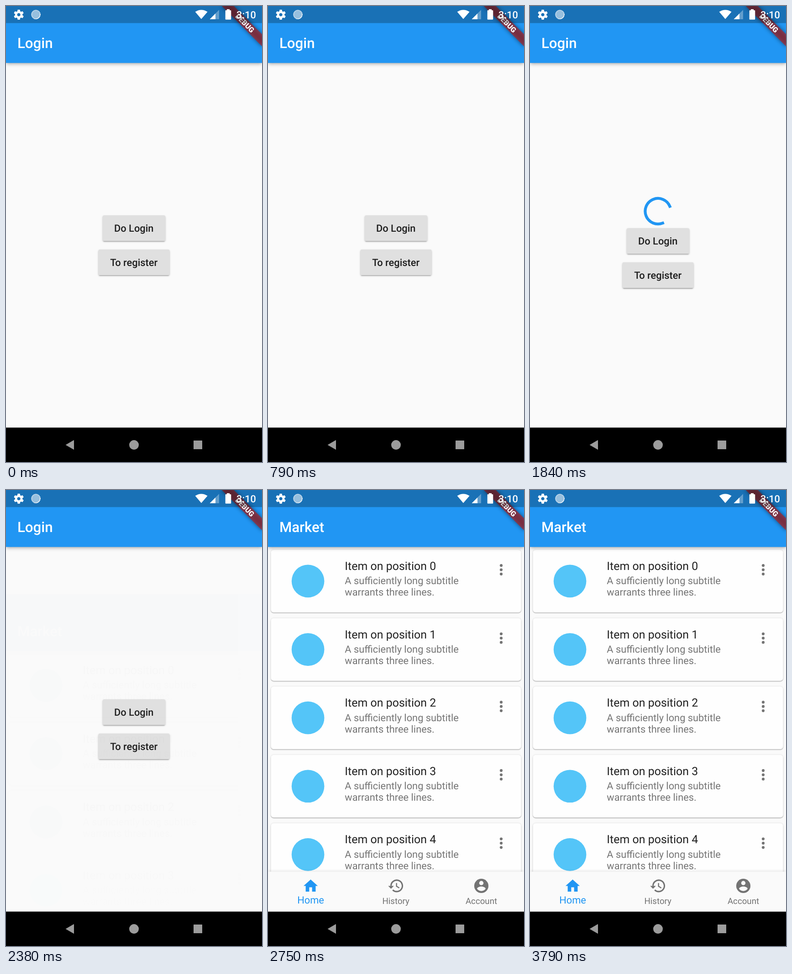
Recreate the animation shown at these times as an HTML page. Size 561 px wide and 998 px high, loop 4000 ms.

```html
<!DOCTYPE html>
<html lang="en">
<head>
<meta charset="utf-8">
<title>Login flow</title>
<style>
  html, body { margin: 0; width: 100%; height: 100%; overflow: hidden; background: #000; }
  /* Everything is laid out on a 360-unit wide screen. */
  #screen {
    position: absolute; left: 0; top: 0; width: 360px; height: 640.5px; overflow: hidden;
    transform: scale(1.55833); transform-origin: 0 0;
    font-family: Roboto, sans-serif; background: #000;
  }
  #app { position: absolute; left: 0; top: 0; width: 360px; height: 592.3px; overflow: hidden; background: #fafafa; }
  .page { position: absolute; inset: 0; background: #fafafa; }
  .bar {
    position: absolute; left: 0; top: 0; width: 360px; height: 80px; background: #2196f3;
    box-shadow: 0 2px 4px -1px rgba(0,0,0,.2), 0 3px 5px rgba(0,0,0,.12), 0 1px 6px rgba(0,0,0,.08);
  }
  svg { position: absolute; left: 0; top: 0; width: 360px; height: 640.5px; overflow: hidden; }
  text { text-rendering: geometricPrecision; }
  .head { font-size: 20px; font-weight: 500; fill: #fff; }
  .btn {
    position: absolute; height: 36px; border-radius: 2px; background: #e0e0e0;
    box-shadow: 0 2px 1px -1px rgba(0,0,0,.18), 0 1px 2px rgba(0,0,0,.14), 0 1px 3px rgba(0,0,0,.1);
  }
  #press {
    position: absolute; inset: 0; border-radius: 2px; background: #c0c0c0;
    box-shadow: 0 4px 4px -2px rgba(0,0,0,.18), 0 5px 8px rgba(0,0,0,.14), 0 2px 8px 1px rgba(0,0,0,.1);
  }
  .label { font-size: 14px; font-weight: 500; fill: rgba(0,0,0,.87); text-anchor: middle; }
  .card {
    position: absolute; left: 4px; width: 352px; height: 88px; border-radius: 4px; background: #fefefe;
    box-shadow: 0 1px 1px rgba(0,0,0,.24), 0 0 2px rgba(0,0,0,.14);
  }
  .name { font-size: 16px; fill: rgba(0,0,0,.87); }
  .sub { font-size: 14px; fill: rgba(0,0,0,.54); }
  #tabs {
    position: absolute; left: 0; top: 536.3px; width: 360px; height: 56px; background: #fafafa;
    box-shadow: 0 -1px 4px rgba(0,0,0,.12);
  }
  .tab { font-size: 12px; fill: #737373; text-anchor: middle; }
  .tab.on { font-size: 14px; fill: #2196f3; }
</style>
</head>
<body>
<div id="screen">
  <div id="app">
    <div class="page">
      <div class="bar"></div>
      <div id="buttons" style="position:absolute;inset:0">
        <div class="btn" style="left:135.6px;top:294.2px;width:88.8px"><div id="press"></div></div>
        <div class="btn" style="left:130.4px;top:342.2px;width:99.2px"></div>
        <svg>
          <text class="label" x="179.8" y="317">Do Login</text>
          <text class="label" x="179.8" y="365">To register</text>
        </svg>
      </div>
      <svg>
        <text class="head" x="16" y="59.2">Login</text>
        <path id="spin" fill="none" stroke="#2196f3" stroke-width="4" stroke-linecap="square"/>
      </svg>
    </div>

    <div class="page" id="market">
      <div id="cards"></div>
      <svg id="items"></svg>
      <div class="bar"></div>
      <svg><text class="head" x="16" y="59.2">Market</text></svg>
      <div id="tabs">
        <svg>
          <path transform="translate(48 8)" fill="#2196f3" d="M10 20v-6h4v6h5v-8h3L12 3 2 12h3v8z"/>
          <g transform="translate(168 8)" fill="none" stroke="#737373">
            <path stroke-width="2" d="M5 12a8 8 0 1 1 2.4 5.7"/>
            <path stroke-width="1.5" d="M12.75 8v4.6l3.9 2.3"/>
            <path stroke="none" fill="#737373" d="M1 12h8l-4 4z"/>
          </g>
          <g transform="translate(300 20)">
            <circle r="10" fill="#737373"/>
            <circle cy="-4" r="3" fill="#fafafa"/>
            <path fill="#fafafa" d="M-6 3.98C-5.97 2-2 .9 0 .9S5.97 2 6 3.98A7.2 7.2 0 0 1-6 3.98z"/>
          </g>
          <text class="tab on" x="60" y="45">Home</text>
          <text class="tab" x="179.8" y="45.6">History</text>
          <text class="tab" x="300" y="45.6">Account</text>
        </svg>
      </div>
    </div>

    <svg>
      <defs><filter id="soft" x="-20%" y="-100%" width="140%" height="300%"><feGaussianBlur stdDeviation="3"/></filter></defs>
      <g transform="translate(360 0) rotate(45)">
        <rect x="-40" y="28" width="80" height="12" opacity=".5" filter="url(#soft)"/>
        <rect x="-42" y="28" width="84" height="12" fill="#b71c1c" fill-opacity=".627"/>
        <text y="37.6" font-size="10.2" font-weight="900" fill="#fff" text-anchor="middle">DEBUG</text>
      </g>
    </svg>
  </div>

  <!-- System bars, in real pixels -->
  <svg viewBox="0 0 561 998" preserveAspectRatio="none">
    <rect width="561" height="37.4" opacity=".25"/>
    <g id="gear" transform="translate(28 19)" fill="#fff"><circle r="5.8" fill="none" stroke="#fff" stroke-width="4.4"/></g>
    <circle cx="65.5" cy="18.7" r="10" fill="#fff" opacity=".55"/>
    <circle cx="65.5" cy="18.7" r="9.4" fill="none" stroke="#fff" stroke-width="2" stroke-dasharray="1.6 1.4" opacity=".75"/>
    <path d="M74 13a10.5 10.5 0 0 1-14 14.5A11 11 0 0 0 74 13z" fill="#fff"/>
    <g fill="#fff">
      <path d="M428 28.6 414.6 12.8Q428 4.2 441.6 12.8z"/>
      <path d="M467 8.5V29H446.5z" opacity=".32"/>
      <path d="M459 16.5V29H446.5z"/>
      <path d="M484 7h6v2.2h2q1.3 0 1.3 1.3V28.4q0 1.4-1.3 1.4H482q-1.3 0-1.3-1.4V10.5q0-1.3 1.3-1.3h2z"/>
      <text x="505" y="26.8" font-size="21.8" font-weight="500">3:10</text>
    </g>
    <rect y="923" width="561" height="75"/>
    <g fill="#9c9c9c" stroke="#9c9c9c" stroke-linejoin="round">
      <path d="M148.5 950.7v19.6L131.5 960.5z"/>
      <circle cx="280.5" cy="960.5" r="10"/>
      <rect x="411.5" y="951.5" width="18" height="18"/>
    </g>
  </svg>
</div>

<script>
const $ = id => document.getElementById(id);
const LOOP = 4000;
const SPIN = [1325, 2325];
const PUSH = [2360, 2660];

for (const a of [0, 60, 120])
  $('gear').innerHTML += `<path transform="rotate(${a})" d="M-2.4-11h4.8l.9 4.6h-6.6zM-2.4 11h4.8l.9-4.6h-6.6z"/>`;

let cards = '', items = '';
for (let i = 0; i < 5; i++) {
  const y = 84 + 96 * i;
  const dots = [-6, 0, 6].map(d => `<circle cx="327.9" cy="${y + 28 + d}" r="2" fill="#757575"/>`).join('');
  cards += `<div class="card" style="top:${y}px"></div>`;
  items += `<circle cx="56.2" cy="${y + 44}" r="23" fill="#54c5f8"/>
    <text class="name" x="108" y="${y + 28.3}">Item on position ${i}</text>
    <text class="sub" x="108" y="${y + 48.5}">A sufficiently long subtitle</text>
    <text class="sub" x="108" y="${y + 64.5}">warrants three lines.</text>${dots}`;
}
$('cards').innerHTML = cards;
$('items').innerHTML = items;

const part = (t, a, b) => Math.min(1, Math.max(0, (t - a) / (b - a)));

// Cubic Bezier easing, solved by bisection
const bezier = (x1, y1, x2, y2) => x => {
  const at = (s, p, q) => 3 * s * (1 - s) ** 2 * p + 3 * s * s * (1 - s) * q + s ** 3;
  let lo = 0, hi = 1;
  for (let i = 0; i < 24; i++) {
    const mid = (lo + hi) / 2;
    if (at(mid, x1, x2) < x) lo = mid; else hi = mid;
  }
  return x <= 0 ? 0 : x >= 1 ? 1 : at(lo, y1, y2);
};
const swift = bezier(.4, 0, .2, 1);
const easeIn = bezier(.42, 0, 1, 1);

function arc(p) {
  const head = swift(part(p, 0, .5)) * 1.5 * Math.PI;
  const tail = swift(part(p, .5, 1)) * 1.5 * Math.PI;
  const from = -Math.PI / 2 + tail + p * 1.7 * Math.PI;
  const sweep = Math.max(head - tail, .001);
  const point = a => `${(180 + 18 * Math.cos(a)).toFixed(3)} ${(288.2 + 18 * Math.sin(a)).toFixed(3)}`;
  return `M${point(from)}A18 18 0 ${sweep > Math.PI ? 1 : 0} 1 ${point(from + sweep)}`;
}

function draw(t) {
  const busy = t >= SPIN[0] && t < SPIN[1];
  $('spin').style.display = busy ? '' : 'none';
  if (busy) $('spin').setAttribute('d', arc(part(t, ...SPIN)));
  $('buttons').style.transform = `translateY(${busy ? 18 : 0}px)`;
  $('press').style.opacity = swift(part(t, 1130, 1300)) * (1 - swift(part(t, 1370, 1570)));

  const p = part(t, ...PUSH);
  $('market').style.opacity = easeIn(p);
  $('market').style.transform = `translateY(${(1 - swift(p)) * 148}px)`;
}

const start = performance.now();
function tick() {
  draw((performance.now() - start) % LOOP);
  requestAnimationFrame(tick);
}
tick();
</script>
</body>
</html>
```
